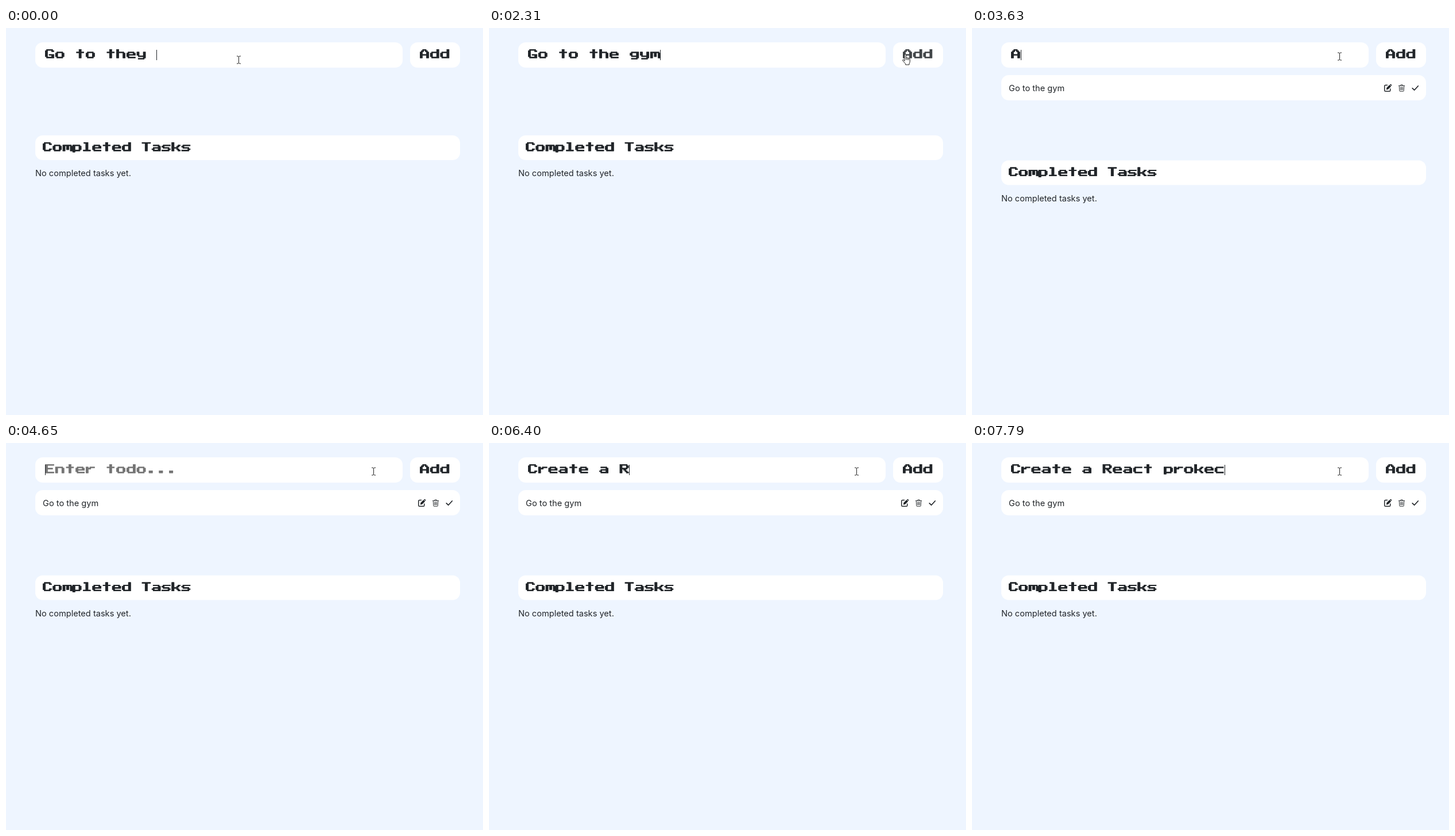
Animation, 831 px wide and 674 px high, one loop 8 s. Source, as an HTML page:

```html
<!DOCTYPE html>
<html lang="en">
<head>
<meta charset="utf-8">
<title>Todo list</title>
<style>
  html, body { margin: 0; width: 100%; height: 100%; overflow: hidden; background: #eef5ff; }
  #stage { position: relative; width: 831px; height: 674px; overflow: hidden; background: #eef5ff;
    color: #212529; font: 14.6px/22px Inter, sans-serif; }
  #stage > *, #lower > * { position: absolute; }
  .card { background: #fff; border-radius: 13px; }
  .plain { white-space: pre; }
  .pixel { height: 18px; white-space: pre; }
  .pixel span { color: transparent; font: 16px/18px "DejaVu Sans Mono", monospace; letter-spacing: 8.1px; }
  svg { position: absolute; left: 0; top: 0; overflow: visible; fill: none; stroke: currentColor; }
  .pixel svg { width: 1px; height: 1px; stroke-linecap: square; }
  #caret { top: 38px; width: 1px; height: 18px; background: #212529; }
  #lower { left: 0; top: 0; }
  .cursor { left: 0; top: 0; width: 1px; height: 1px; }
</style>
</head>
<body>
<div id="stage">
  <div class="card" style="left:51px;top:25px;width:640px;height:43.5px"></div>
  <div class="card" style="left:704px;top:25px;width:87px;height:43.5px"></div>
  <div class="pixel" id="field" style="left:68px;top:37.3px"></div>
  <div id="caret"></div>
  <div class="pixel" id="add" style="left:720.6px;top:37.1px"></div>

  <div id="task" class="card" style="left:51px;top:82px;width:740px;height:44px">
    <div class="plain" style="position:absolute;left:13px;top:11.5px">Go to the gym</div>
    <svg width="740" height="44" stroke-width="1.5">
      <path d="M673 17.5H669.5Q667.7 17.5 667.7 19.3V26.7Q667.7 28.3 669.5 28.3H676Q677.7 28.3 677.7 26.7V23.5"/>
      <path d="M670.7 25.4L671.4 22.1L676.4 17.1L679.1 19.8L674.1 24.8ZM677 16.5L677.7 15.8Q678.3 15.4 678.9 16L680 17.1Q680.5 17.7 680 18.3L679.4 19Z" fill="currentColor" stroke="none"/>
      <path d="M692 18.5H703M695.3 18.3L696.1 16.8H699L699.8 18.3M693.2 18.5L693.8 27.3Q693.9 28.3 695 28.3H700Q701.1 28.3 701.2 27.3L701.8 18.5M695.6 20.5V26.3M697.5 20.5V26.3M699.4 20.5V26.3" stroke-width=".9"/>
      <path d="M716.2 22.8L719.6 26.2L726.2 19" stroke-width="1.7" stroke-linecap="round" stroke-linejoin="round"/>
    </svg>
  </div>

  <div id="lower">
    <div class="card" style="left:51px;top:187px;width:740px;height:43px"></div>
    <div class="pixel" id="done" style="left:64.1px;top:199.4px"></div>
    <div class="plain" style="left:51px;top:241.5px">No completed tasks yet.</div>
  </div>

  <svg class="cursor" id="beam"><path d="M-3.5 -6.5H-1.5L0 -5.5L1.5 -6.5H3.5M0 -5.5V5.5M-3.5 6.5H-1.5L0 5.5L1.5 6.5H3.5" stroke="#222"/></svg>
  <svg class="cursor" id="hand">
    <path d="M4 12.5V2Q4 .5 5.2 .5T6.5 2V7Q7.6 5.9 8.8 7.2Q10 6.2 11 7.8Q13.2 7 13.3 9.3V13Q13.3 15.5 12 17V19H5.6V17.3L.9 12Q.2 10.6 1.4 10T4 12.5ZM6.5 7V10.5M8.8 7.4V10.8M11 8V11" fill="#fff" stroke="#222"/>
  </svg>
</div>
<script>
// Strokes of each letter; one unit is the pen width across and one row down.
const GLYPHS = {
  A: "M1 0H1.5M.5 1h0M2 1h0M0 2V6M2.5 2V6M0 4H2.5",
  C: "M.5 0H2M0 1V5M.5 6H2M2.5 1h0M2.5 5h0",
  E: "M2.5 0H0V6H2.5M0 3H2",
  G: "M.5 0H2M2.5 1h0M0 1V5M.5 6H2.5V4H1.5",
  R: "M0 6V0H2M2.5 1V2M2 3H0M1.5 4h0M2 5h0M2.5 6h0",
  T: "M0 0H2.5M1.25 0V6",
  a: "M.5 2H2M2.5 3V6M2.5 4H.5M0 5h0M.5 6H2.5",
  c: "M.5 2H2.5M0 3V5M.5 6H2.5",
  d: "M2.5 0V6M2.5 2H.5M0 3V5M.5 6H2.5",
  e: "M.5 2H2M0 3V5M2.5 3V4H0M.5 6H2.5",
  g: "M2.5 2V6M2.5 2H.5M0 3V4M.5 5H2.5M.5 7H2",
  h: "M0 0V6M.5 2H2M2.5 3V6",
  k: "M0 0V6M.5 4H1.5M2 3h0M2.5 2h0M2 5h0M2.5 6h0",
  l: "M.5 0H1.25V6M.25 6H2.25",
  m: "M0 2V6M0 2H2.5M1.5 2V5M3 3V6",
  n: "M0 2V6M0 2H2M2.5 3V6",
  o: "M.5 2H2M0 3V5M.5 6H2M2.5 3V5",
  p: "M0 2V7M0 2H2M2.5 3V5M0 6H2",
  r: "M0 2V6M.5 3H1M1.5 2H2.5",
  s: "M.5 2H2.5M0 3h0M.5 4H2M2.5 5h0M0 6H2",
  t: "M1.25 0V6M.25 2H2.25",
  y: "M0 2V4M.5 5H2.5M2.5 2V6M.5 7H2",
  ".": "M.75 5h.5V6h-.5z"
};
const PITCH = 17.735, ROW = 2.2, LOOP = 8000;
const $ = id => document.getElementById(id);

function write(el, text, pitch = PITCH, bold = .3) {
  const pen = pitch / 4;
  const letter = (ch, i) => GLYPHS[ch]
    ? `<path d="${GLYPHS[ch]}" transform="translate(${i * pitch + pen / 2} ${ROW / 2}) scale(${pen} ${ROW})"/>` : "";
  const line = [...text].map(letter).join("");
  el.innerHTML = `<span>${text}</span><svg aria-hidden="true">${line}<g transform="translate(${bold})">${line}</g></svg>`;
}

// Time, typed text, caret on
const TYPING = [
  [0, "Go to they ", 1], [510, "Go to the", 1], [640, "Go to the ", 0], [900, "Go to the ", 1],
  [1040, "Go to the g", 1], [1170, "Go to the gy", 1], [1300, "Go to the gym", 1],
  [1810, "Go to the gym", 0], [2310, "Go to the gym", 1], [2440, "", 0],
  [2860, "", 1], [3370, "", 0], [3630, "A", 1], [4140, "A", 0], [4270, "", 0], [4650, "", 1],
  [4930, "C", 1], [5050, "Cr", 1], [5200, "Cre", 1], [5330, "Crea", 1], [5490, "Create", 1],
  [5740, "Create a", 1], [5860, "Create a ", 1], [6400, "Create a R", 1], [6530, "Create a Re", 1],
  [6660, "Create a Rea", 1], [6790, "Create a Reac", 1], [6940, "Create a React", 1],
  [7100, "Create a React ", 1], [7230, "Create a React p", 1], [7370, "Create a React pr", 1],
  [7500, "Create a React pro", 1], [7650, "Create a React prok", 1], [7790, "Create a React prokec", 1]
];
// Time, cursor shape, x, y
const POINTER = [
  [0, "beam", 405.5, 55.5], [1810, "beam", 470.5, 48.5], [1930, "beam", 590.5, 35.5],
  [2050, "beam", 670.5, 38.5], [2170, "hand", 707, 45], [2310, "hand", 720, 45],
  [2580, "hand", 713, 47], [2730, "beam", 668.5, 54.5], [2860, "beam", 640.5, 49.5]
];
// Time, opacity of the button label
const HOVER = [[0, 1], [2310, .85], [2440, .7], [2730, .85], [2860, 1]];

const at = (steps, t) => steps.findLast(s => s[0] <= t);
let shown = null;

function draw(t) {
  const [, text, caret] = at(TYPING, t);
  if (text !== shown) {
    write($("field"), text || "Enter todo...");
    $("field").style.color = text ? "" : "#757575";
    shown = text;
  }
  $("caret").style.left = Math.max(68, Math.floor(67.58 + text.length * PITCH)) + "px";
  $("caret").style.opacity = caret;

  const added = t >= 2440;
  $("task").style.visibility = added ? "visible" : "hidden";
  $("lower").style.transform = `translateY(${added ? 43.5 : 0}px)`;
  $("add").style.opacity = at(HOVER, t)[1];

  const [, shape, x, y] = at(POINTER, t);
  for (const id of ["beam", "hand"]) {
    $(id).style.visibility = id === shape ? "visible" : "hidden";
    $(id).style.transform = `translate(${x}px, ${y}px)`;
  }
}

write($("add"), "Add");
write($("done"), "Completed Tasks", 17.25, .7);
const start = performance.now();
function tick() {
  draw((performance.now() - start) % LOOP);
  requestAnimationFrame(tick);
}
tick();
</script>
</body>
</html>
```
